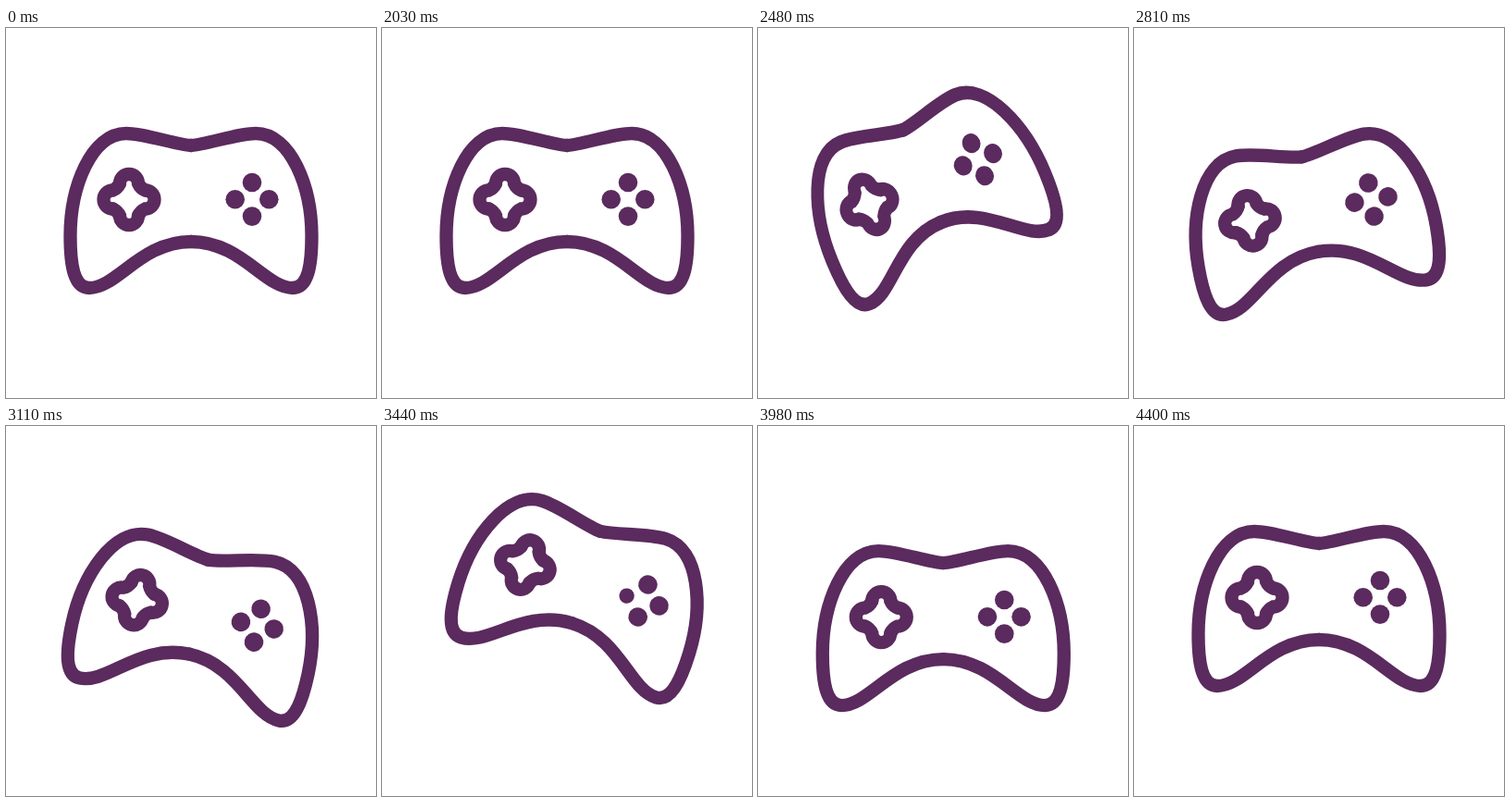
Animation, 400 px wide and 400 px high, one loop 4.49 s. Source, as an HTML page:

```html
<!DOCTYPE html>
<html lang="en">
<head>
<meta charset="utf-8">
<title>Gamepad</title>
<style>
  html, body { margin: 0; width: 100%; height: 100%; overflow: hidden; background: #fff; }
  svg { display: block; width: 100%; height: 100%; }
  #pad { fill: none; stroke: #5b2a5e; stroke-width: 14.3; stroke-linecap: round; }
  circle { fill: #5b2a5e; stroke: none; }
</style>
</head>
<body>
<svg viewBox="0 0 400 400">
  <g id="pad">
    <path id="half" d="M200 127C183 126 150 114 130 114C92 114 69.5 172 69.5 225
      C69.5 258 74 281 90 281C120 281 146 231 200 231"/>
    <use href="#half" transform="translate(400) scale(-1 1)"/>
  </g>
</svg>
<script>
const LOOP = 4490;
const BUTTON_RADIUS = 10.3;
const pad = document.getElementById('pad');

function add(tag, attributes) {
  const node = document.createElementNS('http://www.w3.org/2000/svg', tag);
  for (const name in attributes) node.setAttribute(name, attributes[name]);
  return pad.appendChild(node);
}

// One arm of the cross and one button per quarter turn; the last button is the left one.
let leftButton;
for (let turn = 0; turn < 360; turn += 90) {
  add('path', {
    d: 'M-10-17.5A10 10 0 0 1 10-17.5Q12.3-12.3 17.5-10',
    transform: `translate(133 185.5) rotate(${turn})`
  });
  leftButton = add('circle', {
    cy: -18.3, r: BUTTON_RADIUS, transform: `translate(266 185.3) rotate(${turn})`
  });
}

const ease = u => (1 - Math.cos(Math.PI * Math.min(1, Math.max(0, u)))) / 2;

// Swells from 0 to 1 at the peak and back to 0.
const pulse = (t, start, peak, end) =>
  t < peak ? ease((t - start) / (peak - start)) : ease((end - t) / (end - peak));

function draw() {
  const t = performance.now() % LOOP;
  const leftHop = pulse(t, 2030, 2520, 2960);
  const rightHop = pulse(t, 2960, 3600, 4020);
  const landing = pulse(t, 2520, 2960, 3600) + pulse(t, 3600, 4020, 4400);
  const stretch = pulse(t, 2030, 2420, 2640);

  const x = 13 * rightHop - 11 * pulse(t, 2030, 2600, 2960);
  const y = 22 * landing - 20.5 * leftHop - 23.5 * rightHop;
  const angle = 18.7 * pulse(t, 2500, 3330, 3920) - 22.5 * pulse(t, 2030, 2500, 3330);

  pad.setAttribute('transform',
    `translate(${200 + x} ${212 + y}) rotate(${angle}) ` +
    `scale(${1 - 0.055 * stretch} ${1 + 0.045 * stretch}) translate(-200 -212)`);
  leftButton.setAttribute('r', BUTTON_RADIUS - 2.1 * pulse(t, 3320, 3440, 3560));
  requestAnimationFrame(draw);
}
draw();
</script>
</body>
</html>
```
